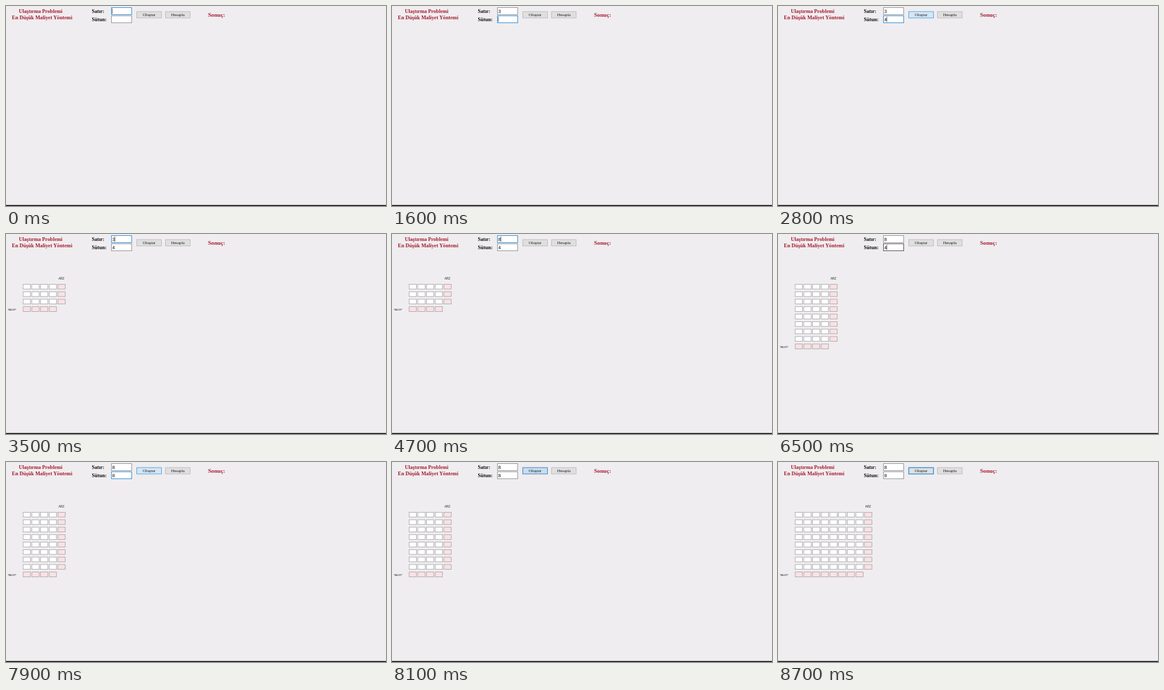
Write an HTML page that moves like this. It is 600 px wide and 316 px high and loops after 8800 ms.

```html
<!DOCTYPE html>
<html lang="tr">
<head>
<meta charset="utf-8">
<style>
html, body { margin: 0; width: 100%; height: 100%; overflow: hidden; background: #efedef; }
svg { display: block; width: 600px; height: 316px; }
text { font-family: "Liberation Sans", Arial, sans-serif; white-space: pre; }
.serif { font-family: "Liberation Serif", "Times New Roman", serif; }
.bold { font-weight: bold; }
</style>
</head>
<body>
<svg id="stage" viewBox="0 0 600 316"></svg>
<script>
const LOOP = 8800, BLINK = 560;
const RED = '#a51c30', BLUE = '#3c96dc';
const stage = document.getElementById('stage');

// Each step overrides part of the form state from its time on.
const steps = [
  [0, { focus: 'rows', rows: '', cols: '', grid: null, hover: false, pressed: false, selected: false, edge: BLUE, caretStart: 0 }],
  [1000, { rows: '3', caretStart: 1000 }],
  [1300, { focus: 'cols', caretStart: 1300 }],
  [1620, { cols: '4', caretStart: 1620 }],
  [2700, { hover: true }],
  [2900, { focus: 'create', pressed: true }],
  [3000, { pressed: false, grid: [3, 4] }],
  [3300, { hover: false }],
  [3400, { focus: 'rows', caretStart: 3400 }],
  [3600, { selected: true }],
  [4300, { rows: '8', selected: false, caretStart: 4300 }],
  [5300, { hover: true }],
  [5600, { focus: 'create', pressed: true }],
  [5700, { pressed: false, grid: [8, 4] }],
  [5900, { hover: false }],
  [6400, { focus: 'cols', edge: '#5a5a5e', caretStart: 6400 }],
  [6600, { selected: true, edge: BLUE }],
  [7100, { cols: '8', selected: false, caretStart: 7100 }],
  [7700, { hover: true }],
  [8100, { focus: 'create', pressed: true }],
  [8200, { pressed: false, grid: [8, 8] }],
  [8600, { hover: false }]
];

const rect = (x, y, w, h, fill, stroke = 'none', line = 1) =>
  `<rect x="${x}" y="${y}" width="${w}" height="${h}" fill="${fill}" stroke="${stroke}" stroke-width="${line}"/>`;

const text = (str, x, y, size, fill, cls = '', anchor = 'start') =>
  `<text x="${x}" y="${y}" font-size="${size}" fill="${fill}" class="${cls}" text-anchor="${anchor}">${str}</text>`;

function field(name, y, state, time) {
  const focused = state.focus === name, value = state[name];
  const selected = focused && state.selected;
  let out = rect(166.5, y, 32, 11, '#fff', focused ? state.edge : '#9a9a9e');
  if (selected) out += rect(167.5, y + 1.5, 5, 8, '#0078d7');
  out += text(value, 167.7, y + 8.6, 7.6, selected ? '#fff' : '#111');
  const caretOn = Math.floor((time - state.caretStart) / BLINK) % 2 === 0;
  if (focused && !selected && caretOn)
    out += rect(value ? 171.6 : 167.6, y + 1.4, 0.7, 8.4, '#333');
  return out;
}

function button(label, x, fill, stroke, line = 0.8) {
  return rect(x, 8.9, 39, 10, fill, stroke, line) +
    text(label, x + 19.5, 16.3, 6.6, '#181818', 'serif', 'middle');
}

function createButton({ hover, pressed, focus }) {
  if (pressed) return button('Oluştur', 206.5, '#c6def2', '#2a6ca5');
  if (hover) return button('Oluştur', 206.5, '#d5e6f5', BLUE);
  if (focus === 'create') return button('Oluştur', 206.5, '#dfe0e2', BLUE, 1.4);
  return button('Oluştur', 206.5, '#e0dfe0', '#b5b4b6');
}

function table([rows, cols]) {
  const left = c => 27.1 + c * 13.7, top = r => 79.4 + r * 11.8;
  let out = text('ARZ', left(cols) + 5.6, 72, 4.6, '#222', '', 'middle') +
    text('TALEP', 2.8, top(rows) + 6.1, 4.3, '#222');
  for (let r = 0; r <= rows; r++)
    for (let c = 0; c <= cols; c++) {
      if (r === rows && c === cols) continue;
      const edgeCell = r === rows || c === cols;
      out += rect(left(c), top(r), 11.5, 7.6, edgeCell ? '#fbe1e3' : '#fff', '#a2a0a3', 0.8);
    }
  return out;
}

function draw(time) {
  const state = Object.assign({}, ...steps.filter(([at]) => at <= time).map(step => step[1]));
  return rect(0, 0, 600, 316, '#efedef') +
    text('Ulaştırma Problemi', 54.7, 11, 8.15, RED, 'serif bold', 'middle') +
    text('En Düşük Maliyet Yöntemi', 57, 21.2, 8.2, RED, 'serif bold', 'middle') +
    text('Satır:', 135.6, 10.6, 8, '#111', 'serif bold') +
    text('Sütun:', 135.6, 23.8, 8.1, '#111', 'serif bold') +
    field('rows', 2.5, state, time) +
    field('cols', 15.5, state, time) +
    createButton(state) +
    button('Hesapla', 251.8, '#e0dfe0', '#b5b4b6') +
    text('Sonuç:', 319, 16.8, 9.2, RED, 'serif bold') +
    (state.grid ? table(state.grid) : '') +
    rect(0, 314.5, 600, 1.5, '#0a0a0a');
}

let shown = '';
function frame() {
  const markup = draw(performance.now() % LOOP);
  if (markup !== shown) stage.innerHTML = shown = markup;
  requestAnimationFrame(frame);
}
frame();
</script>
</body>
</html>
```
